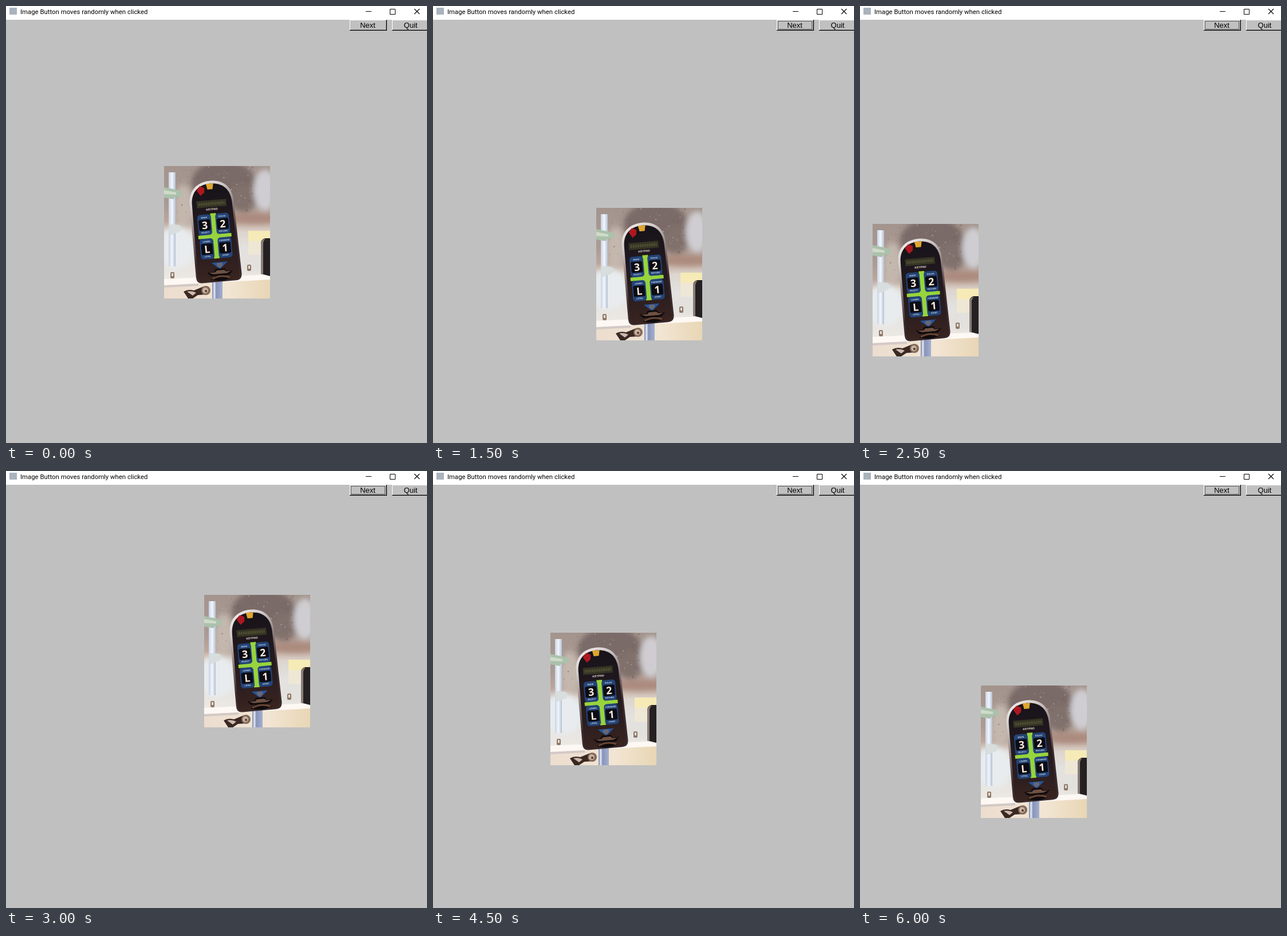
Write an HTML page that moves like this. It is 735 by 762 pixels and loops after 6.5 s.

```html
<!DOCTYPE html>
<html lang="en">
<head>
<meta charset="utf-8">
<title>Image Button</title>
<style>
html, body { margin: 0; width: 100%; height: 100%; overflow: hidden; background: #c0c0c0; }
svg { display: block; }
.title { font: 11.36px Roboto, sans-serif; }
.label { font: 13px "Liberation Sans", Arial, sans-serif; text-anchor: middle; }
.key { font: bold 18px "Noto Sans", sans-serif; text-anchor: middle; fill: #fbeee2; }
.tiny { font: bold 3.6px "Liberation Sans", sans-serif; text-anchor: middle; fill: #dfe3ee; }
.plate { font: bold 5px "Liberation Sans", sans-serif; text-anchor: middle; fill: #f5e9e2; }
</style>
</head>
<body>
<svg width="735" height="762" viewBox="0 0 735 762">
  <defs>
    <linearGradient id="scene" x2="0" y2="1">
      <stop offset="0" stop-color="#a3948d"/>
      <stop offset=".3" stop-color="#ab9b94"/>
      <stop offset=".42" stop-color="#bea79b"/>
      <stop offset=".5" stop-color="#ddd5ce"/>
      <stop offset=".62" stop-color="#e2e1df"/>
      <stop offset=".85" stop-color="#ece8e3"/>
    </linearGradient>
    <linearGradient id="shelf">
      <stop offset="0" stop-color="#ecddcf"/>
      <stop offset=".6" stop-color="#f2e5d3"/>
      <stop offset="1" stop-color="#e8d6b5"/>
    </linearGradient>
    <linearGradient id="pole">
      <stop offset="0" stop-color="#c9d3e5"/>
      <stop offset=".5" stop-color="#f3f7fc"/>
      <stop offset="1" stop-color="#b5c0d3"/>
    </linearGradient>
    <linearGradient id="post">
      <stop offset="0" stop-color="#7682a6"/>
      <stop offset=".22" stop-color="#e8edf8"/>
      <stop offset=".38" stop-color="#8793b8"/>
      <stop offset="1" stop-color="#a4b0d0"/>
    </linearGradient>
    <linearGradient id="rim" x2=".3" y2="1">
      <stop offset="0" stop-color="#fbf8f6"/>
      <stop offset=".25" stop-color="#cfc7c6"/>
      <stop offset=".5" stop-color="#877a7a"/>
      <stop offset=".75" stop-color="#3a2b2e"/>
    </linearGradient>
    <linearGradient id="case" x2="0" y2="1">
      <stop offset="0" stop-color="#17131a"/>
      <stop offset=".7" stop-color="#2a1d20"/>
      <stop offset="1" stop-color="#39241f"/>
    </linearGradient>
    <filter id="soft" x="-30%" y="-30%" width="160%" height="160%"><feGaussianBlur stdDeviation="5"/></filter>
    <clipPath id="crop"><rect width="185" height="231"/></clipPath>
  </defs>

  <rect width="735" height="762" fill="#c0c0c0"/>
  <rect width="735" height="24" fill="#fff"/>
  <rect x="6" y="3" width="13" height="12" fill="#a9b3bd"/>
  <text class="title" x="25" y="14">Image Button moves randomly when clicked</text>
  <path d="M628 9.5h10M670.5 5.5h9v9h-9z" fill="none" stroke="#000"/>
  <path d="M713 5l9 9m0-9l-9 9" stroke="#000" stroke-width="1.1"/>
  <g id="bar"></g>
  <rect id="focus" x="602.5" y="26.5" width="59" height="14" fill="none" stroke="#000" stroke-dasharray="1 1"/>

  <g id="photo" clip-path="url(#crop)">
    <rect width="185" height="231" fill="url(#scene)"/>
    <g filter="url(#soft)">
      <ellipse cx="104" cy="30" rx="56" ry="40" fill="#7a6b67"/>
      <ellipse cx="138" cy="56" rx="24" ry="24" fill="#81716c"/>
      <ellipse cx="176" cy="42" rx="20" ry="36" fill="#cfcdd1"/>
      <ellipse cx="34" cy="70" rx="16" ry="38" fill="#c3b7ae"/>
      <ellipse cx="158" cy="91" rx="46" ry="9" fill="#ab8a7d"/>
      <ellipse cx="22" cy="142" rx="34" ry="36" fill="#e8ecee"/>
      <ellipse cx="158" cy="168" rx="26" ry="18" fill="#e3e1dd"/>
    </g>
    <g id="leaves"></g>
    <path d="M147 113h38v42h-38z" fill="#efe7d6"/>
    <path d="M147 113h38v18h-38z" fill="#f6eab6"/>
    <path d="M8 11h12v164h-12z" fill="url(#pole)"/>
    <path d="M0 37l20 4 10 3q4 5 0 9l-11 1-3 4-16-3z" fill="#abc1ab"/>
    <path d="M0 42l21 4v4l-21-1z" fill="#cfdbc9"/>
    <path d="M9 101l17 2q8 5 0 12l-16 6z" fill="#d7dedd"/>
    <path d="M0 201L185 193v38H0z" fill="url(#shelf)"/>
    <path d="M0 197L185 189v9L0 208z" fill="#fdf8f3"/>
    <path d="M0 208l60-3v4L0 212z" fill="#d3c9c6"/>
    <path d="M185 126h-9q-7 2-7 10v52l16 4z" fill="#252022"/>
    <path d="M176 127q-7 2-7 9v52l4 1v-53q0-6 4-9z" fill="#887d79"/>
    <g id="latches"></g>
    <path d="M34 219q8-5 18-2l17-7 9 4-4 10-15 1-9 6H42z" fill="#3a2822"/>
    <path d="M40 219q9-2 16 2l-6 5z" fill="#cdb9ae"/>
    <circle cx="73" cy="217" r="8" fill="#826a5a"/>
    <circle cx="72" cy="217" r="5" fill="#c8b2a0"/>
    <circle cx="73" cy="218" r="2" fill="#4c382e"/>
    <path d="M84 201h18v30H84z" fill="url(#post)"/>

    <g id="device" transform="translate(88 114.3) rotate(-5)">
      <path d="M-39-50C-39-76-22-89 0-89S38-76 38-50L41 76Q41 88 30 88H-29Q-39 88-39 77Z" fill="url(#rim)"/>
      <path d="M-35-49C-35-73-20-84 0-84S34-73 35-49L38 75Q38 86 28 86H-27Q-36 86-36 76Z" fill="url(#case)"/>
      <path d="M-25-74l6-7 8 4-1 8-7 5z" fill="#ad1820"/>
      <path d="M-8-84H5L3-74H-6z" fill="#dfa52e"/>
      <rect x="-27" y="-55" width="52" height="12" fill="#353424"/>
      <path d="M-24-49H22" stroke="#4d4b32" stroke-width="5" stroke-dasharray="3 1"/>
      <text class="plate" x="-1" y="-37.5">KEYPAD</text>
      <path d="M-5-32H5Q3-3 9 4L29 5V11L9 12Q4 18 5 47H-5Q-4 18-9 12L-29 11V5L-9 4Q-4-3-5-32Z" fill="#98d43c"/>
      <g id="keys"></g>
      <path d="M-10 54H18L4 66Z" fill="#24559d"/>
      <path d="M-1 55H9V60L4 64L-1 60Z" fill="#676674"/>
      <path d="M-19 70H-7L-4 65H12L15 70H26L20 77H12L22 83Q4 90-14 83L-5 77H-13Z" fill="#100c0d"/>
      <path d="M-16 71H-5L-2 68H11L14 71H23L15 74H-8Z" fill="#6f5143"/>
      <path d="M-11 82Q4 75 20 82" fill="none" stroke="#684635" stroke-width="3"/>
    </g>
  </g>
</svg>
<script>
const get = id => document.getElementById(id);

const button = (x, w, text, cx) => `
  <rect x="${x}" y="24" width="${w}" height="19" fill="#000"/>
  <rect x="${x}" y="24" width="${w - 1}" height="18" fill="#fff"/>
  <rect x="${x + 1}" y="25" width="${w - 2}" height="17" fill="#808080"/>
  <rect x="${x + 1}" y="25" width="${w - 3}" height="16" fill="#c0c0c0"/>
  <text class="label" x="${cx}" y="38">${text}</text>`;
get('bar').innerHTML = button(600, 65, 'Next', 631.5) + button(674, 65, 'Quit', 706.5);

const key = (x, y, text, top, low) => `
  <g transform="translate(${x} ${y})">
    <rect x="-12" y="-18" width="24" height="36" rx="5" fill="#234477"/>
    <rect x="-10" y="-9" width="20" height="19" rx="2" fill="#0d0c13"/>
    <text class="key" y="7">${text}</text>
    <text class="tiny" y="-11.5">${top}</text>
    <text class="tiny" y="14.5">${low}</text>
  </g>`;
get('keys').innerHTML =
  key(-16, -13, '3', 'MODE', 'SELECT') + key(15.5, -13, '2', 'ROUTE', 'RETURN') +
  key(-15.5, 29, 'L', 'LOWER', 'LEVEL') + key(16, 29, '1', 'FORWARD', 'START');

const latch = (x, y) => `
  <rect x="${x}" y="${y}" width="7" height="11" rx="2" fill="#8d796a"/>
  <rect x="${x + 2}" y="${y + 2}" width="3" height="5" fill="#e8ddd0"/>`;
get('latches').innerHTML = latch(11, 185) + latch(145, 172);

let seed = 7;
const rand = () => (seed = seed * 16807 % 2147483647) / 2147483647;
const tones = ['#665852', '#a8978e', '#c5b7af', '#8f7c72'];
get('leaves').innerHTML = Array.from({ length: 120 }, (_, i) => {
  const x = 24 + rand() * 136, y = rand() * 88;
  return `<circle cx="${x}" cy="${y}" r="${0.5 + rand()}" fill="${tones[i % 4]}" opacity=".5"/>`;
}).join('');

// The photo jumps to a new place every half second.
const step = 500;
const spots = [
  [276, 279], [273, 96], [380, 127], [285, 352], [99, 122], [22, 380], [346, 216],
  [452, 501], [390, 395], [205, 282], [414, 312], [43, 206], [211, 374]
];
let shown = -1;

function draw(time) {
  const n = Math.floor(time / step) % spots.length;
  if (n === shown) return;
  shown = n;
  get('photo').setAttribute('transform', `translate(${spots[n]})`);
  get('focus').setAttribute('visibility', n ? 'visible' : 'hidden');
}

const start = performance.now();
function tick() {
  draw(performance.now() - start);
  requestAnimationFrame(tick);
}
tick();
</script>
</body>
</html>
```
